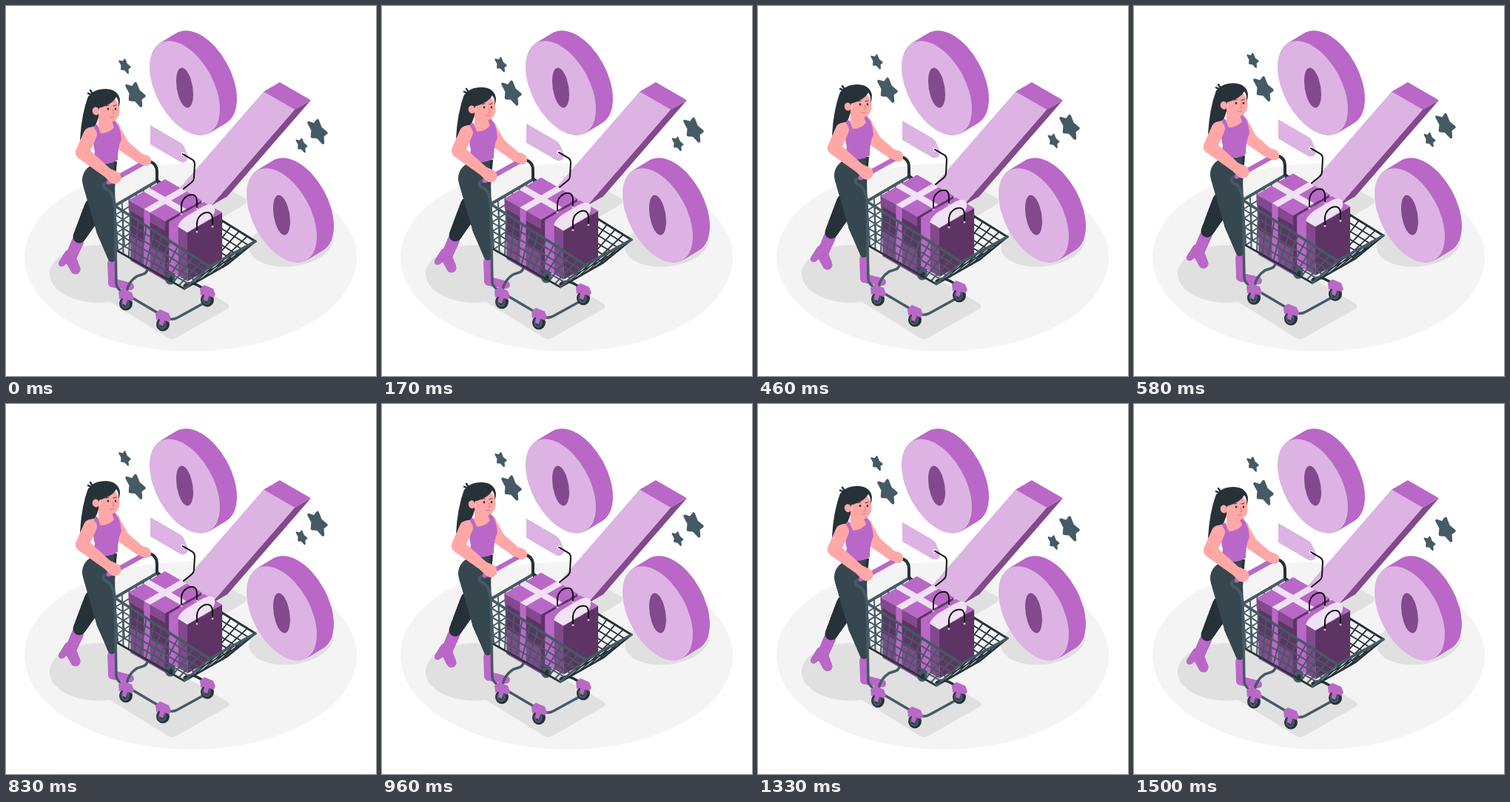
These frames come from a looping animation (500x500 px, 1.54 s). An HTML page with a canvas:

```html
<!DOCTYPE html>
<html lang="en">
<head>
<meta charset="utf-8">
<title>Shopping discount</title>
<style>
html, body { margin: 0; width: 100%; height: 100%; overflow: hidden; background: #fff; }
canvas { display: block; width: 500px; height: 500px; }
</style>
</head>
<body>
<canvas id="stage"></canvas>
<script>
const canvas = document.getElementById('stage');
const ctx = canvas.getContext('2d');
const ratio = window.devicePixelRatio || 1;
canvas.width = canvas.height = 500 * ratio;

const LOOP = 1540, STEPS = 37, RISE = 10;
const PURPLE = '#ba68c8', PALE = '#dcb3e3', MIST = '#f1e1f4';
const PLUM = '#82498c', DEEP = '#5d3464', SHADE = '#e0e0e0';
const SLATE = '#455a64', TROUSER = '#37474f', INK = '#263238', SKIN = '#ffa8a7';

// Isometric ground axes: u runs down-right, v runs down-left.
const u = n => [n * 0.866, n * 0.5];
const v = n => [-n * 0.866, n * 0.5];
const down = n => [0, n];
const add = (...vectors) => vectors.reduce((p, q) => [p[0] + q[0], p[1] + q[1]]);
const mix = (p, q, t) => p.map((n, i) => n + (q[i] - n) * t);

function fill(color, path) {
  ctx.fillStyle = color;
  ctx.fill(new Path2D(path));
}

function line(color, width, path) {
  ctx.strokeStyle = color;
  ctx.lineWidth = width;
  ctx.stroke(new Path2D(path));
}

function oval(color, x, y, rx, ry = rx, turn = 0) {
  ctx.beginPath();
  ctx.ellipse(x, y, rx, ry, turn, 0, Math.PI * 2);
  ctx.fillStyle = color;
  ctx.fill();
}

function quad(color, origin, side, edge) {
  const corners = [origin, add(origin, side), add(origin, side, edge), add(origin, edge)];
  fill(color, 'M' + corners.join('L') + 'Z');
}

function box(back, a, b, height, top, left, right) {
  quad(left, add(back, v(b)), u(a), down(height));
  quad(right, add(back, u(a)), v(b), down(height));
  quad(top, back, u(a), v(b));
}

// Tapering limb through joints given as [x, y, radius].
function limb(color, ...joints) {
  for (let i = 1; i < joints.length; i++) {
    for (let t = 0; t <= 1; t += 1 / 32) oval(color, ...mix(joints[i - 1], joints[i], t));
  }
}

// Ellipse on an upright plane that recedes to the left.
function disc(color, x, y, halfWidth, shear, height) {
  ctx.save();
  ctx.transform(halfWidth, shear, 0, height, x, y);
  oval(color, 0, 0, 1);
  ctx.restore();
}

function zero(x, y) {
  for (let t = 1; t > 0; t -= 1 / 32) disc(PURPLE, x + t * 23, y - t * 14, 47.5, 28.5, 57);
  disc(PALE, x, y, 47.5, 28.5, 57);
  disc(PLUM, x, y - 0.5, 11.5, 9, 25.5);
}

function star(x, y, r) {
  ctx.beginPath();
  for (let i = 0; i < 10; i++) {
    const a = (i / 5 - 0.5) * Math.PI, d = r * (i % 2 ? 0.5 : 0.9);
    ctx.lineTo(...add([x, y], u(Math.cos(a) * d), down(Math.sin(a) * d)));
  }
  ctx.closePath();
  ctx.fillStyle = ctx.strokeStyle = SLATE;
  ctx.lineWidth = r * 0.24;
  ctx.fill();
  ctx.stroke();
}

// Wire panel between a top edge a-b and a bottom edge d-c.
function mesh(color, width, [a, b, c, d], cols, rows) {
  const wires = [];
  for (let i = 0; i <= cols; i++) wires.push([mix(a, b, i / cols), mix(d, c, i / cols)]);
  for (let i = 0; i <= rows; i++) wires.push([mix(a, d, i / rows), mix(b, c, i / rows)]);
  line(color, width, wires.map(w => 'M' + w.join('L')).join(''));
}

function slab() {
  const back = [370, 103], along = [-113, 130];
  const width = u(48.5), depth = v(25.4);
  quad(PLUM, add(back, width), depth, along);
  quad(PALE, add(back, depth), width, along);
  quad(PURPLE, back, width, depth);
}

function scenery() {
  oval('#f4f4f4', 249.5, 340, 224.5, 127);
  oval(SHADE, 125, 362, 66, 39);
  oval(SHADE, 385, 321, 57, 31, -0.12);
  fill(SHADE, 'M128 392L218 448Q224 452 231 448L298 410Q305 406 299 402L190 338Z');
  fill(SHADE, 'M262 280L300 247L323 260Q329 264 321 269L285 290Z');
  slab();
  zero(241.5, 111);
  zero(372.5, 283);
}

function tag() {
  fill(PALE, 'M195 161L233 183Q239 186 241 191L246 203Q246 213 236 211L195 187Z');
  oval('#fff', 239, 200, 2.6);
  line('#111', 2, 'M239 200L251 207Q255 209 255 214L254 232Q254 236 250 239L240 247');
}

function legs() {
  limb(PURPLE, [97, 318, 8], [87, 341, 7.5], [94, 356, 6.5]);
  limb(PURPLE, [86, 336, 7], [75, 348, 4]);
  limb(INK, [120, 272, 14], [99, 312, 8.5]);
  limb(PURPLE, [143, 347, 5.5], [144, 374, 6], [168, 379, 5]);
  quad(INK, [140, 210], [10, 0], [-3, 36]);
  quad(TROUSER, [117, 209], [30, 0], [-3, 22]);
  limb(TROUSER, [125, 235, 22], [135, 302, 13], [143, 341, 5]);
}

function torso() {
  fill(INK, 'M111 122Q102 146 100 181Q119 173 125 150L128 118Z');
  limb(SKIN, [150, 171, 7], [158, 188, 8], [181, 206, 6.5], [189, 209, 7]);
  limb(SKIN, [115, 172, 8], [146, 166, 9]);
  limb(SKIN, [133, 150, 8], [134, 166, 9]);
  fill(PURPLE, 'M119 162L123 160L128 172Q139 172 146 164L143 156L147 154Q155 164 156 180Q151 190 151 208Q138 217 118 211L120 196Q116 186 121 174Z');
}

function head() {
  oval(SKIN, 140, 140, 13.5, 17, -0.1);
  fill(INK, 'M111 123Q118 112 135 112Q152 113 154 127Q154 133 152 137Q153 128 149 123Q144 133 125 138L122 151L112 148Z');
  line(INK, 2.5, 'M118 121L111 118M118 120L114 114');
  oval(SKIN, 121.5, 142, 4.7, 5.5, -0.3);
  for (const x of [138, 148]) {
    oval(INK, x, 139, 1.3, 1.6);
    line(INK, 0.9, `M${x - 3} 135l4 -1`);
  }
  line('#d96f76', 0.9, 'M144 140L146 145L143.5 146M140 150Q143 151.5 146 149.5');
}

function nearArm() {
  limb(SKIN, [114, 173, 9], [103, 198, 9], [138, 226, 6.5], [147, 232, 8.5]);
  limb(SKIN, [183, 207, 6], [190, 210, 6]);
}

function gift() {
  const back = [215, 234], size = 57, band = 9.5, start = 24;
  const left = add(back, v(size)), right = add(back, u(size));
  box(add(back, down(15)), 54, 54, 68, PLUM, PLUM, DEEP);
  quad(DEEP, add(back, down(15), v(54)), u(54), down(34));
  box(back, size, size, 13, PURPLE, PLUM, DEEP);
  quad(MIST, add(back, u(start)), u(band), v(size));
  quad(MIST, add(back, v(start)), v(band), u(size));
  quad(PURPLE, add(left, u(start)), u(band), down(78));
  quad(PLUM, add(right, v(start)), v(band), down(78));
}

function bag() {
  const back = [267, 264.5], a = 29, b = 54, height = 66;
  box(back, a, b, height, PURPLE, PLUM, DEEP);
  quad(PURPLE, add(back, v(b)), u(a / 2), down(height));
  fill(MIST, 'M232 298Q235 290 244 284L264 272Q276 265 281 270Q285 277 277 287L245 306Z');
  for (const [x, y] of [[237, 281], [258, 305]]) {
    line('#111', 2, `M${x} ${y}v-12q1 -9 9 -13q11 -4 12 7v11`);
    oval(PALE, x, y, 1.5);
    oval(PALE, x + 21, y - 7, 1.5);
  }
}

function caster(x, y) {
  oval(INK, x, y + 3, 9, 9.5);
  oval(SLATE, x - 1, y + 3, 6, 7);
  oval(INK, x - 1, y + 4, 2.6, 3.2);
  fill(PURPLE, `M${x - 10} ${y - 12}l6 -5l12 5l3 8l-3 4l-6 -2l-2 8l-5 -3l1 -7l-5 1z`);
}

const rim = { left: [147, 270], back: [205, 236], tip: [337, 318], front: [275, 352] };
const base = { left: [151, 331], back: [205, 294], tip: [299, 349], front: [241, 382] };
const panel = (from, to) => [rim[from], rim[to], base[to], base[from]];
const rail = (...corners) => 'M' + corners.join('L');

function basketBack() {
  mesh(SLATE, 1.8, panel('left', 'back'), 6, 5);
  mesh(INK, 1.8, panel('back', 'tip'), 12, 5);
  line(SLATE, 4, rail(rim.left, rim.back));
  line(INK, 3, rail(rim.back, rim.tip));
}

function cartFrame() {
  line(SLATE, 3.5, 'M163 386Q165 373 177 365L186 362Q190 361 192 354');
  line(INK, 3.5, 'M241 378Q249 371 262 379L269 383');
  line(SLATE, 3.5, 'M147 267L149 376Q150 382 158 387L214 420Q223 426 232 421L272 399');
  oval(SLATE, 222, 369, 7, 7.5);
  oval(INK, 222, 369, 3.5, 4);
  caster(162, 399);
  caster(212, 427);
  caster(272, 394);
}

function basketFront() {
  mesh(INK, 1.6, panel('front', 'tip'), 5, 2);
  mesh(SLATE, 2, panel('left', 'front'), 12, 5);
  line(INK, 2.6, rail(base.left, base.front, base.tip, rim.tip));
  line(SLATE, 3.6, rail(rim.left, rim.front, rim.tip));
  line(SLATE, 3, rail(rim.front, base.front));
}

function handle() {
  line(SLATE, 4, 'M136 239Q129 240 133 246L140 250Q146 257 147 271');
  line(INK, 4, 'M186 212L194 210Q204 213 204 224V236');
  line(PURPLE, 6.5, 'M139 238L186 212');
}

function shopper() {
  legs();
  torso();
  head();
}

function cart() {
  basketBack();
  gift();
  bag();
  cartFrame();
  basketFront();
  handle();
}

function liftAt(ms) {
  const step = Math.floor((ms % LOOP + 5) / LOOP * STEPS);
  return RISE * Math.abs(1 - Math.abs(step - 17.2) / 18) - 0.5;
}

function draw(now) {
  ctx.setTransform(ratio, 0, 0, ratio, 0, 0);
  ctx.lineCap = ctx.lineJoin = 'round';
  ctx.fillStyle = '#fff';
  ctx.fillRect(0, 0, 500, 500);
  scenery();
  ctx.translate(0, -liftAt(now - start));
  star(160.5, 81, 9.5);
  star(175, 119, 16);
  star(399.5, 188, 9.2);
  star(421, 169, 16);
  tag();
  shopper();
  cart();
  nearArm();
  requestAnimationFrame(draw);
}

const start = performance.now();
draw(start);
</script>
</body>
</html>
```
